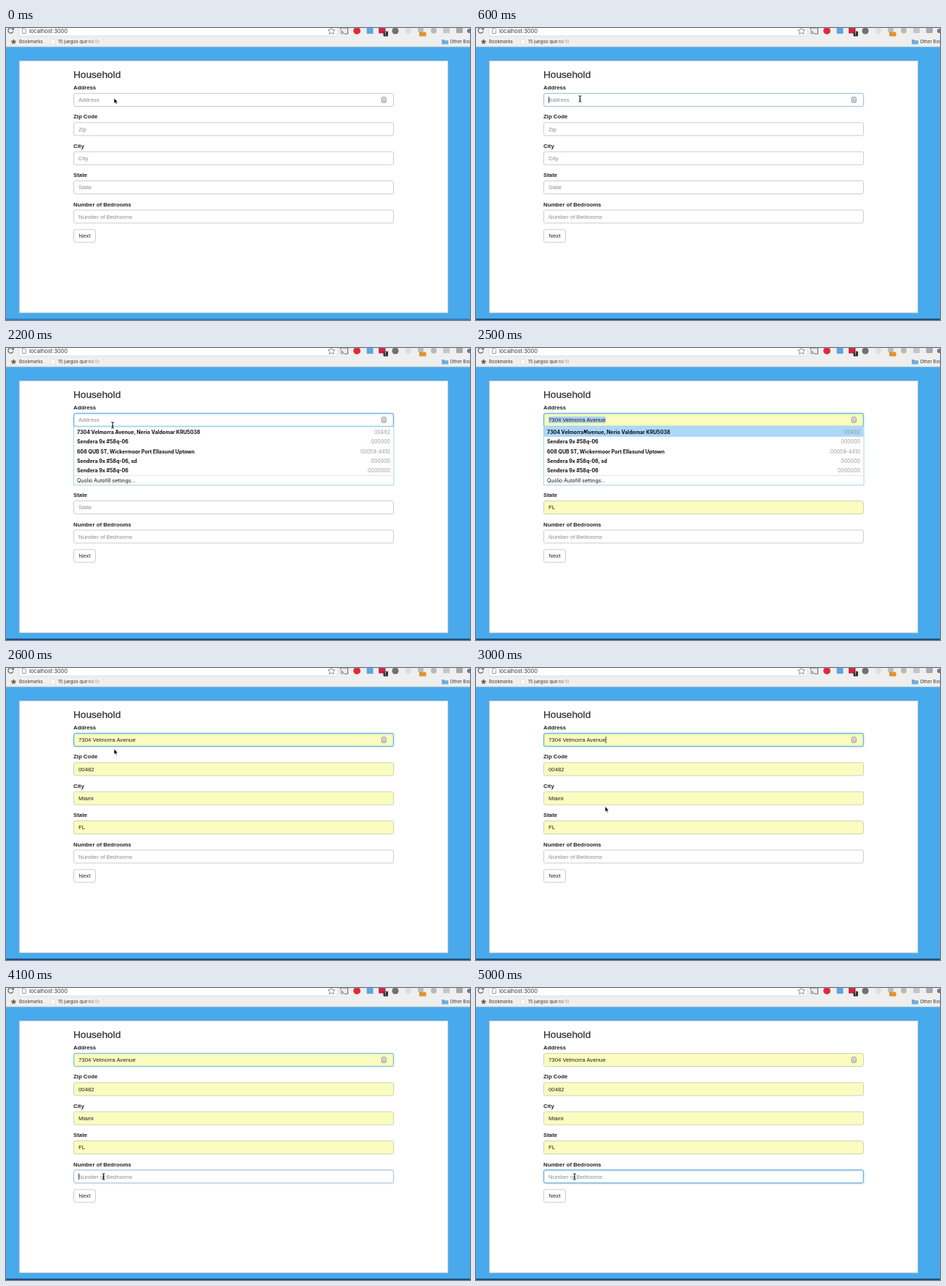
These frames come from a looping animation (640x404 px, 5.1 s). An HTML page:

```html
<!DOCTYPE html>
<html lang="en">
<head>
<meta charset="utf-8">
<title>Household form</title>
<style>
  html, body { margin: 0; width: 100%; height: 100%; overflow: hidden; background: #49a9ed; }
  svg { display: block; width: 640px; height: 404px; }
  text { font: 7.8px "Liberation Sans", Arial, sans-serif; fill: #222; white-space: pre; }
  .ui { font: 7px Inter, sans-serif; fill: #111; }
  .bar { font: 6.2px Inter, sans-serif; fill: #333; }
  .url { font: 7.5px Inter, sans-serif; fill: #333; }
  .bold { font-weight: 700; }
  .semi { font-weight: 650; }
  .title { font-size: 13.65px; stroke: #333; stroke-width: .3px; fill: #333; }
  .hint { fill: #8b8b8b; }
  .zip { fill: #999; text-anchor: end; }
  .box { fill: #fff; stroke: #ccc; }
  .focus { fill: none; stroke: #66afe9; filter: drop-shadow(0 0 1.8px rgba(102, 175, 233, .75)); }
</style>
</head>
<body>
<svg id="stage" viewBox="0 0 640 404" xmlns="http://www.w3.org/2000/svg"></svg>
<script>
const LOOP = 5100, STEP = 100;
const FOCUS_ADDRESS = 550, OPEN_LIST = 1800, PICK = 2600, FOCUS_ROOMS = 4050;
const ADDRESS = '7304 Velmorra Avenue';

const fields = [
  ['Address', 'Address', ADDRESS],
  ['Zip Code', 'Zip', '00482'],
  ['City', 'City', 'Miami'],
  ['State', 'State', 'FL'],
  ['Number of Bedrooms', 'Number of Bedrooms', '']
].map(([label, hint, value], i) => ({ label, hint, value, top: 90.5 + i * 40.35 }));

const suggestions = [
  [ADDRESS + ', Nerio Valdomar KRU5038', '00482'],
  ['Sendera 9x #58q-06', '000000'],
  ['608 QUB ST, Wickermoor Port Ellasund Uptown', '00059-4410'],
  ['Sendera 9x #58q-06, sd', '000000'],
  ['Sendera 9x #58q-06', '0000000']
];

// time, x, y of the pointer's hot spot
const path = [
  [0, 149, 97], [400, 143.5, 98], [1200, 143.5, 98], [1500, 144.5, 99], [1900, 144.5, 99],
  [2400, 148.5, 111], [2600, 149, 112], [3000, 178, 191.5], [3600, 134, 261],
  [4100, 134.5, 261], [4400, 136, 261], [LOOP, 136, 261]
];

const rect = (x, y, w, h, attrs = '') =>
  `<rect x="${x}" y="${y}" width="${w}" height="${h}" ${attrs}/>`;
const dot = (x, y, r, fill) => `<circle cx="${x}" cy="${y}" r="${r}" fill="${fill}"/>`;
const text = (x, y, str, cls = '', attrs = '') =>
  `<text x="${x}" y="${y}" class="${cls}" ${attrs}>${str}</text>`;
const line = (d, stroke, width = 1, attrs = '') =>
  `<path d="${d}" fill="none" stroke="${stroke}" stroke-width="${width}" ${attrs}/>`;

function toolbar() {
  return rect(0, 0, 640, 26, 'fill="#efefef"') +
    rect(18, -6, 439, 17, 'rx="2" fill="#fff" stroke="#cfcfcf" stroke-width=".6"') +
    line('M0 26H640', '#c6c6c6', .8) +
    line('M9.4 1.2A3.6 3.6 0 1 0 9.9 4.8', '#666', 1.2) +
    '<path d="M7.6 2.8H11V-.6Z" fill="#666"/>' +
    line('M22.5 .5H26L27.5 2V7.5H22.5Z', '#888', .8) +
    text(32, 6.7, 'localhost:3000', 'url') +
    line('M449 -1L450.5 2.5L454 2.8L451.3 5.1L452.2 8.7L449 6.7L445.8 8.7L446.7 5.1L444 2.8L447.5 2.5Z', '#777', .8) +
    line('M461.5 2.5V0H471.5V8H467M461.5 8h.8M461.5 6a2.2 2.2 0 0 1 2.4 2.2M461.5 4a4.3 4.3 0 0 1 4.4 4.2', '#666', 1) +
    dot(484, 3.8, 4.9, '#dc2b3a') +
    rect(497.5, 0, 9, 8, 'rx="1" fill="#5ba7e2"') +
    rect(514, -1, 9.5, 8.5, 'rx="1" fill="#d3253f"') +
    rect(520.5, 4.5, 6.5, 7, 'rx="1" fill="#333"') +
    text(522.1, 10, '1', 'bar', 'style="fill:#fff;font-size:5.5px"') +
    dot(537, 4, 4.6, '#707070') +
    dot(555, 4, 4.4, '#dedede') +
    dot(572, 3, 4.2, '#bdbdbd') +
    rect(570, 5.5, 9.5, 6, 'rx="1" fill="#e0942f"') +
    dot(590, 3.5, 4, '#b9b9b9') +
    rect(603, -1, 9, 8, 'rx="1" fill="#c3c7cb"') +
    rect(621, -1, 9, 8, 'rx="1" fill="#a9a9a9"') +
    dot(639, 4, 3, '#777') +
    '<path d="M10.5 15L11.7 17.6L14.5 17.9L12.4 19.8L13 22.6L10.5 21.1L8 22.6L8.6 19.8L6.5 17.9L9.3 17.6Z" fill="#666"/>' +
    text(18, 21.2, 'Bookmarks', 'bar') +
    rect(61.5, 15.5, 6.5, 7, 'rx="1" fill="#fafafa" stroke="#ccc" stroke-width=".5"') +
    text(72, 21.2, '15 juegos que no fa', 'bar', 'style="fill:url(#fade)"') +
    '<path d="M601 16h3.4l1 1.2h4.6v5.3h-9Z" fill="#6aaee0"/>' +
    text(612.5, 21.2, 'Other Bookmarks', 'bar');
}

function field({ label, hint, value, top }, i) {
  return text(93, top - 5.4, label, 'bold') +
    rect(93.5, top, 441, 18, `id="box${i}" class="box" rx="2.2"`) +
    rect(93.5, top, 441, 18, `id="focus${i}" class="focus" rx="2.2"`) +
    (i ? '' : rect(100, top + 4.2, 80, 9.2, 'id="selection" fill="#adcff0"')) +
    text(100, top + 11.8, hint, 'hint', `id="hint${i}"`) +
    text(100, top + 11.8, value, '', `id="value${i}"`);
}

function list() {
  const rows = suggestions.map(([name, zip], i) => {
    const y = 119.1 + i * 13.25;
    return text(98, y, name, 'ui semi') + text(530, y, zip, 'ui zip');
  }).join('');
  return '<g id="list">' +
    rect(93.5, 108.8, 441.5, 81, 'fill="#fff" stroke="#a9d3ea"') +
    rect(94, 109.2, 440.5, 13.6, 'id="hover" fill="#abd7fa"') +
    rows + line('M94 176.5H534.5', '#ddd', .8) +
    text(98, 186.1, 'Quolio Autofill settings...', 'ui') + '</g>';
}

const stage = document.getElementById('stage');
stage.innerHTML =
  `<defs><linearGradient id="fade" gradientUnits="userSpaceOnUse" x1="112" x2="136" y1="0" y2="0">
    <stop stop-color="#333"/><stop offset="1" stop-color="#333" stop-opacity="0"/></linearGradient></defs>` +
  rect(0, 0, 640, 404, 'fill="#49a9ed"') + toolbar() +
  rect(18.5, 45.5, 591, 348.5, 'fill="#fff" stroke="#b9c9d6" stroke-width=".8"') +
  rect(0, 402, 640, 2, 'id="edge"') +
  text(93, 68.9, 'Household', 'title') +
  fields.map(field).join('') +
  rect(518.5, 95.8, 5.6, 7.2, 'rx=".8" fill="#fff" stroke="#777" stroke-width=".9"') +
  dot(521.3, 98.4, 1, '#777') + line('M519.8 101H522.8', '#777', 1) +
  rect(93.5, 278.8, 30, 17.6, 'class="box" rx="2.2"') + text(100.3, 290.4, 'Next') +
  rect(100, 0, .8, 9, 'id="caret" fill="#111"') + list() +
  '<path id="arrow" d="M0 0V7.4L1.7 5.9L2.9 8.6L4.2 8L3 5.4H5.3Z" fill="#000" stroke="#fff" stroke-width=".6"/>' +
  '<g id="beam">' +
    line('M-1.8 -4.2Q0 -4.2 0 -3Q0 -4.2 1.8 -4.2M0 -3.4V3.4M-1.8 4.2Q0 4.2 0 3Q0 4.2 1.8 4.2M-1 1H1', '#111', 1) + '</g>';

const $ = id => document.getElementById(id);
const show = (id, on) => $(id).style.display = on ? '' : 'none';
const clamp = v => Math.max(0, Math.min(1, v));
const valueWidth = $('value0').getComputedTextLength();
$('selection').setAttribute('width', valueWidth);

function pointerAt(t) {
  const n = path.findIndex(p => p[0] > t);
  const [t0, x0, y0] = path[n - 1], [t1, x1, y1] = path[n];
  const k = (t - t0) / (t1 - t0), e = k * k * (3 - 2 * k);
  return [x0 + (x1 - x0) * e, y0 + (y1 - y0) * e];
}

function draw(t) {
  const [x, y] = pointerAt(t);
  const open = t >= OPEN_LIST && t < PICK;
  const hovering = open && y > 109;
  const filled = hovering || t >= PICK;

  show('list', open);
  show('hover', hovering);
  show('selection', hovering);
  fields.forEach((f, i) => {
    const auto = filled && f.value;
    show('value' + i, auto);
    show('hint' + i, !auto);
    $('box' + i).style.fill = auto ? '#fafdbf' : '#fff';
    $('box' + i).style.stroke = auto ? '#cfd3b4' : '#ccc';
    $('focus' + i).style.opacity = 0;
  });

  // focus ring eases over 150 ms
  const ring = start => clamp((t - start) / 150);
  $('focus0').style.opacity = ring(FOCUS_ADDRESS) - ring(FOCUS_ROOMS);
  $('focus4').style.opacity = ring(FOCUS_ROOMS);

  const rooms = t >= FOCUS_ROOMS;
  const since = rooms ? FOCUS_ROOMS : t >= PICK ? PICK + 100 : FOCUS_ADDRESS + 50;
  show('caret', t >= since && (t - since) % 1000 < 500 && !hovering);
  $('caret').setAttribute('x', !rooms && filled ? 100 + valueWidth : 100);
  $('caret').setAttribute('y', fields[rooms ? 4 : 0].top + 4.4);

  const overField = fields.some(f => y > f.top && y < f.top + 18.4);
  const beam = t >= 200 && overField && !hovering;
  show('beam', beam);
  show('arrow', !beam);
  $(beam ? 'beam' : 'arrow').setAttribute('transform', `translate(${x} ${y})`);
  $('edge').style.fill = t < 100 ? '#3480b8' : '#1d507e';
}

function tick() {
  draw(Math.floor(performance.now() % LOOP / STEP) * STEP);
  requestAnimationFrame(tick);
}
tick();
</script>
</body>
</html>
```
